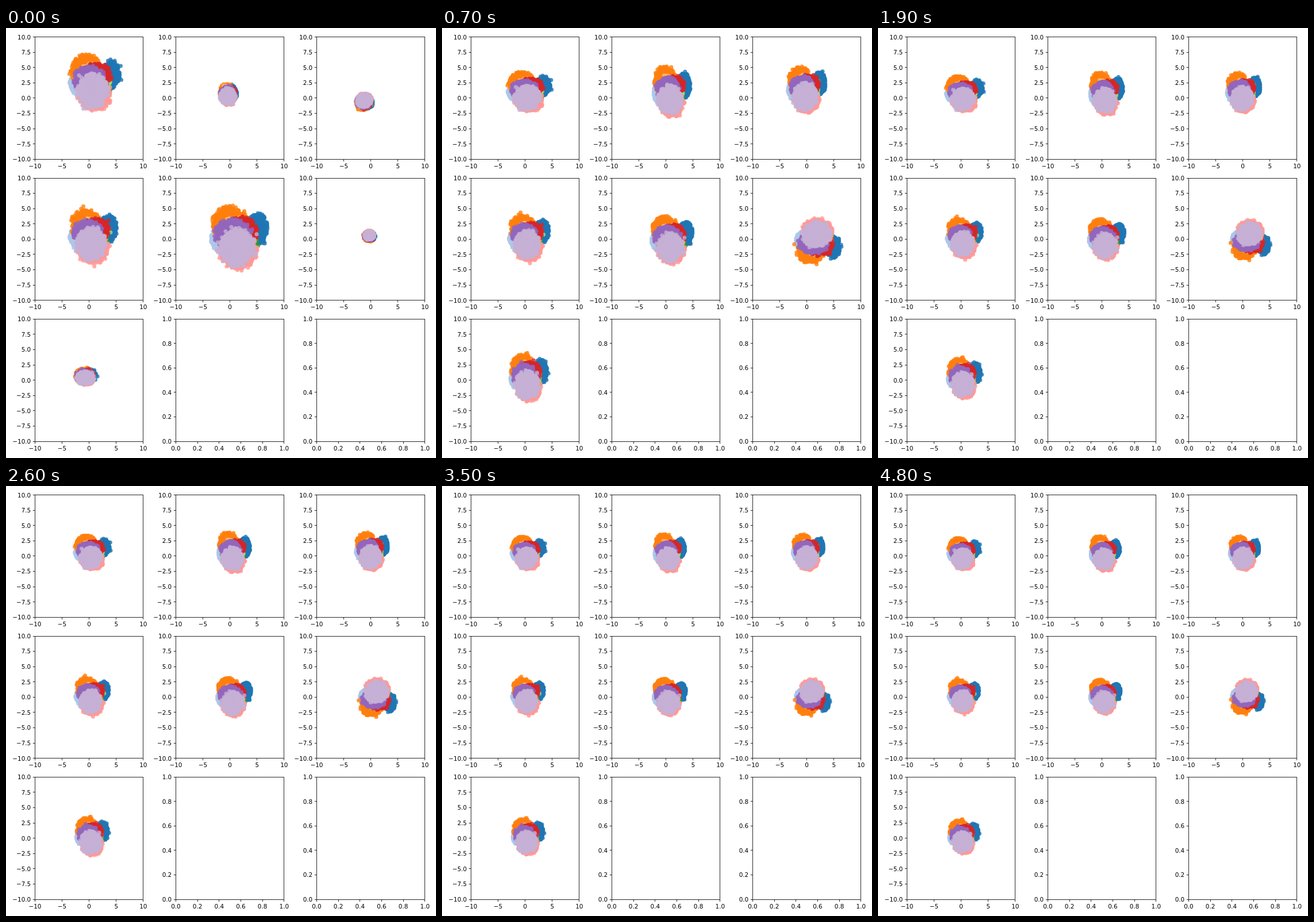
Write an HTML page with a canvas that moves like this. It is 748 by 748 pixels and loops after 4.9 s.

```html
<!DOCTYPE html>
<html lang="en">
<head>
<meta charset="utf-8">
<title>Scatter panels</title>
<style>
html, body { margin: 0; width: 100%; height: 100%; overflow: hidden; background: #fff; }
canvas { display: block; }
</style>
</head>
<body>
<canvas id="stage" width="748" height="748"></canvas>
<script>
const ctx = document.getElementById('stage').getContext('2d');
const STEP = 100, STEPS = 49, DOT = 3.5, TAU = Math.PI * 2;
const PITCH = 245, ROW_PITCH = 245.4, WIDTH = 188.4, HEIGHT = 212.6, LEFT = 50.4, TOP = 15.6;

// Centre and radii of each class inside a panel's bounding box, which spans -1 to 1.
const CLASSES = [
  { color: '#1f77b4', x: 0.6, y: -0.24, rx: 0.4, ry: 0.53 },
  { color: '#aec7e8', x: -0.66, y: 0.03, rx: 0.32, ry: 0.42 },
  { color: '#ff7f0e', x: -0.3, y: -0.38, rx: 0.66, ry: 0.62 },
  { color: '#ffbb78', x: -0.15, y: -0.2, rx: 0.45, ry: 0.45 },
  { color: '#2ca02c', x: 0.25, y: 0.2, rx: 0.4, ry: 0.45 },
  { color: '#98df8a', x: 0.15, y: -0.05, rx: 0.5, ry: 0.5 },
  { color: '#d62728', x: 0.05, y: -0.2, rx: 0.65, ry: 0.48 },
  { color: '#ff9896', x: 0, y: 0.42, rx: 0.7, ry: 0.58 },
  { color: '#9467bd', x: -0.21, y: -0.1, rx: 0.67, ry: 0.5 },
  { color: '#c5b0d5', x: -0.08, y: 0.27, rx: 0.68, ry: 0.63 }
];

// Boxes are [left, top, right, bottom] in pixels from the data origin.
const PANELS = [
  { start: [-38, -82, 57, 26], spread: [-38, -57, 53, 27] },
  { start: [-22, -28, 16, 16], spread: [-27, -68, 51, 40] },
  { start: [-30, -12, 8, 24], spread: [-42, -68, 39, 30], startFlip: -1 },
  { start: [-38, -58, 52, 46], spread: [-35, -53, 50, 46] },
  { start: [-38, -63, 69, 57], spread: [-32, -49, 56, 53] },
  { start: [-16, -18, 11, 7], spread: [-24, -41, 73, 51], flip: -1 },
  { start: [-28, -25, 16, 12], spread: [-32, -57, 46, 46] }
];
const GOAL = [-23, -31, 31, 27];

let seed = 7;
function rand() {
  seed = (seed * 1664525 + 1013904223) >>> 0;
  return seed / 4294967296;
}

// Points of a unit disc with a ragged rim and a few strays.
function cloud() {
  return Array.from({ length: 320 }, () => {
    const a = rand() * TAU;
    const reach = rand() < 0.012 ? 1.25 : 0.94 + 0.16 * rand() ** 3;
    const r = Math.sqrt(rand()) * reach;
    return [r * Math.cos(a), r * Math.sin(a)];
  });
}
PANELS.forEach(p => p.clouds = CLASSES.map(cloud));

function drawCluster(points, color, x, y, rx, ry) {
  ctx.fillStyle = color;
  ctx.beginPath();
  ctx.ellipse(x, y, rx * 0.9, ry * 0.9, 0, 0, TAU);
  ctx.fill();
  ctx.globalAlpha = 0.8;
  for (const [u, v] of points) {
    ctx.beginPath();
    ctx.arc(x + u * rx, y + v * ry, DOT, 0, TAU);
    ctx.fill();
  }
  ctx.globalAlpha = 1;
}

// The boxes close in on a common goal with the logarithm of the step.
function boxAt(p, step) {
  if (step === 0) return p.start;
  const u = 0.8 * Math.max(-0.3, Math.log(step / 3) / Math.log(16));
  return p.spread.map((v, i) => v + (GOAL[i] - v) * u);
}

function drawPanel(p, i, step) {
  const [l, t, r, b] = boxAt(p, step);
  const cx = LEFT + WIDTH / 2 + PITCH * (i % 3) + (l + r) / 2;
  const cy = TOP + HEIGHT / 2 + ROW_PITCH * Math.floor(i / 3) + (t + b) / 2;
  const hw = (r - l) / 2, hh = (b - t) / 2;
  const flip = (step === 0 && p.startFlip) || p.flip || 1;
  // Small initial blobs overlap more.
  const apart = step === 0 ? Math.min(1, hw / 45) : 1;
  const radius = (share, half) => Math.max(1, (1 - (1 - share) * apart) * half - DOT);
  CLASSES.forEach((c, n) => drawCluster(p.clouds[n], c.color,
    cx + c.x * apart * hw, cy + c.y * apart * hh * flip, radius(c.rx, hw), radius(c.ry, hh)));
}

const label = (v, digits) => v.toFixed(digits).replace('-', '\u2212');
const snap = v => Math.floor(v) + 0.5;

function drawAxes(i) {
  const row = Math.floor(i / 3), empty = i > 6;
  const x0 = LEFT + PITCH * (i % 3), y0 = TOP + ROW_PITCH * row + HEIGHT;
  const left = snap(x0), right = snap(x0 + WIDTH);
  const top = snap(y0 - HEIGHT), bottom = snap(y0);
  const xCount = empty ? 5 : 4, yCount = empty ? 5 : 8;
  ctx.strokeStyle = ctx.fillStyle = '#000';
  ctx.lineWidth = 0.83;
  ctx.font = '10.4px "DejaVu Sans", sans-serif';
  ctx.strokeRect(left, top, right - left, bottom - top);
  ctx.beginPath();
  ctx.textAlign = 'center';
  for (let k = 0; k <= xCount; k++) {
    const x = x0 + WIDTH * k / xCount;
    ctx.moveTo(snap(x), bottom);
    ctx.lineTo(snap(x), bottom + 3.65);
    ctx.fillText(empty ? label(k / 5, 1) : label(k * 5 - 10, 0), x, bottom + 15);
  }
  ctx.textAlign = 'right';
  for (let k = 0; k <= yCount; k++) {
    const y = y0 - HEIGHT * k / yCount;
    ctx.moveTo(left, snap(y));
    ctx.lineTo(left - 3.65, snap(y));
    ctx.fillText(label(empty ? k / 5 : k * 2.5 - 10, 1), left - 7.3, y + 3.9);
  }
  ctx.stroke();
}

let shown = -1;
const began = performance.now();
function frame() {
  const step = Math.floor((performance.now() - began) / STEP) % STEPS;
  if (step !== shown) {
    shown = step;
    ctx.fillStyle = '#fff';
    ctx.fillRect(0, 0, 748, 748);
    PANELS.forEach((p, i) => drawPanel(p, i, step));
    for (let i = 0; i < 9; i++) drawAxes(i);
  }
  requestAnimationFrame(frame);
}
frame();
</script>
</body>
</html>
```
